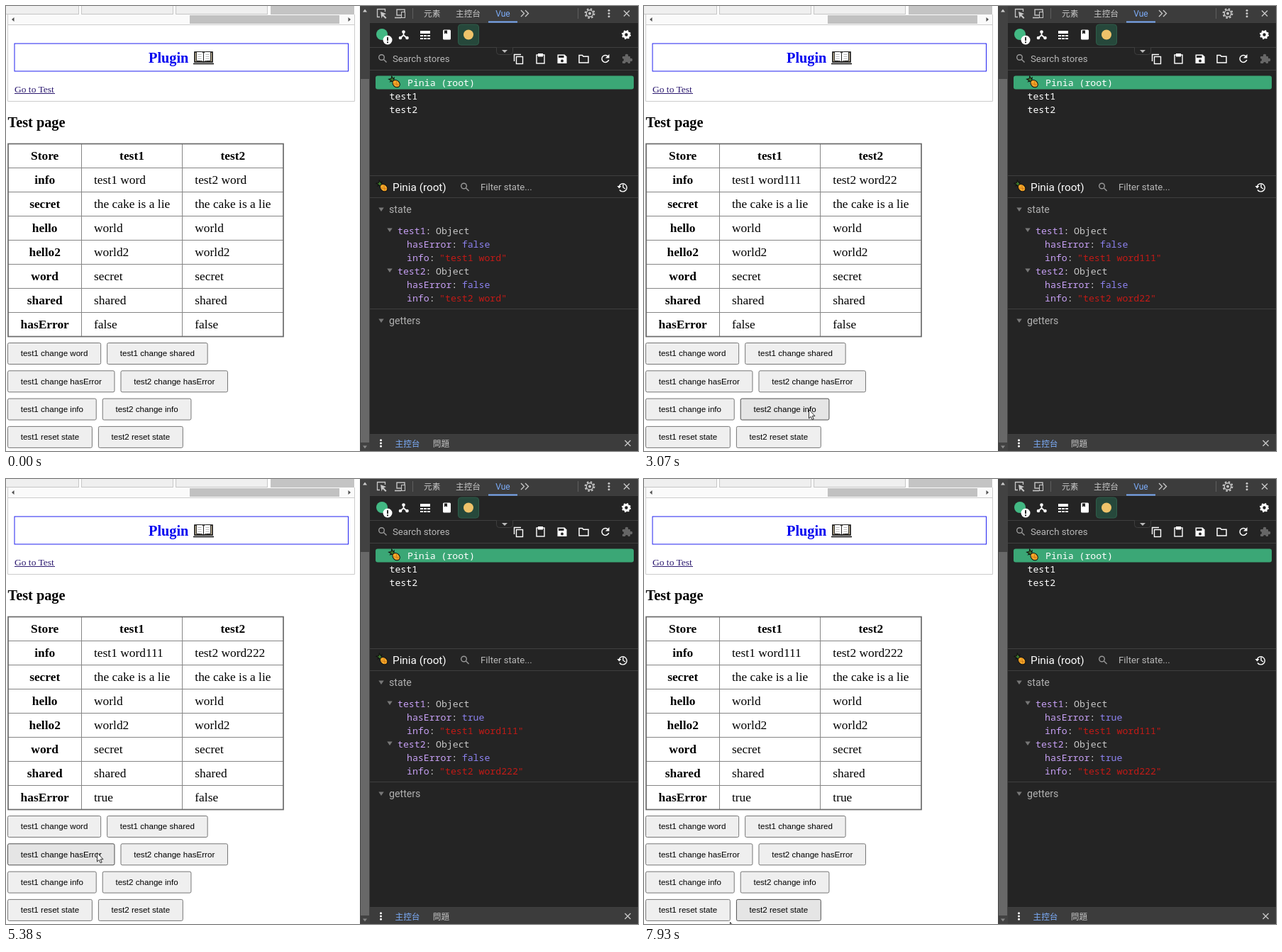
Write an HTML page that moves like this. It is 891 px wide and 628 px high and loops after 8 s.

```html
<!DOCTYPE html>
<html lang="zh-Hant">
<head>
<meta charset="utf-8">
<title>Store plugin test</title>
<style>
html, body { margin: 0; width: 100%; height: 100%; overflow: hidden; background: #fff; }
svg { display: block; width: 891px; height: 628px; }
text { white-space: pre; }
.serif { font-family: "Liberation Serif", "Times New Roman", serif; font-size: 17.4px; }
.title { font-size: 20.3px; }
.link { font-size: 13.5px; }
.bold { font-weight: 700; }
.mid { text-anchor: middle; }
.arial { font-family: "Liberation Sans", Arial, sans-serif; font-size: 11.6px; }
.ui { font-family: Roboto, sans-serif; font-size: 13.2px; }
.tab { font-size: 12px; }
.section { font-size: 14.2px; }
.store { font-size: 15.3px; }
.cjk { font-family: "Noto Sans CJK TC", "Noto Sans CJK", sans-serif; font-size: 11.7px; }
.mono { font-family: "Roboto Mono", "Noto Sans Mono", monospace; font-size: 13.2px; }
</style>
</head>
<body>
<svg id="stage" viewBox="0 0 891 628" xmlns="http://www.w3.org/2000/svg"></svg>
<script>
const stage = document.getElementById('stage');

function el(tag, attrs, parent = stage) {
  const node = document.createElementNS('http://www.w3.org/2000/svg', tag);
  for (const key in attrs) node.setAttribute(key, attrs[key]);
  parent.appendChild(node);
  return node;
}
const group = (x, y) => el('g', { transform: `translate(${x} ${y})` });
const rect = (x, y, width, height, fill, more, parent) =>
  el('rect', { x, y, width, height, fill, ...more }, parent);
const frame = (x, y, w, h, stroke, width = 1) =>
  rect(x, y, w, h, 'none', { stroke, 'stroke-width': width });
const path = (d, fill, parent, more) => el('path', { d, fill, ...more }, parent);
const line = (d, stroke, width = 1, parent) => path(d, 'none', parent, { stroke, 'stroke-width': width });
const dot = (cx, cy, r, fill, parent) => el('circle', { cx, cy, r, fill }, parent);
const ring = (cx, cy, r, stroke, width, more) =>
  el('circle', { cx, cy, r, fill: 'none', stroke, 'stroke-width': width, ...more });
function label(x, y, words, cls, fill) {
  const node = el('text', { x, y, class: cls, fill });
  node.textContent = words;
  return node;
}

// ---- Page ----
rect(0, 0, 499, 628, '#fff');
for (let i = 0; i < 3; i++) rect(133 * i - 26.5, -20, 129, 31.5, '#efefef', { stroke: '#c6c6c6' });
rect(373, 0, 118, 12, '#c4c4c4');
rect(2, 12, 490, 14, '#fafafa');
rect(259, 13, 211, 12, '#c1c1c1');
path('M11.5 16v6l-3.5-3z', '#505050');
path('M482.5 16v6l3.5-3z', '#505050');
line('M2.5 12V134.5H491.5V12M2 26.5H492', '#ccc');

frame(12, 53, 470.5, 39, '#2020f0');
label(201, 80, 'Plugin', 'serif title bold', '#0000f0');
line('M264 81.5H293', '#111', 1.6);
rect(266, 65, 25, 14, '#d8c9a8', { stroke: '#111', 'stroke-width': 1.6 });
for (const side of [-1, 1]) {
  const page = el('g', { transform: `translate(278.5 64.5) scale(${side} 1)` });
  path('M0 3q0-3 3-3h7v13h-6q-3 0-4 2z', '#fff', page, { stroke: '#222' });
  line('M3 4h5m-5 3h5m-5 3h5', '#aaa', .8, page);
}

label(12, 122, 'Go to Test', 'serif link', '#2c1a70');
line('M12 123.5H69', '#2c1a70');
label(2.5, 171, 'Test page', 'serif title bold', '#000');

for (let i = 1; i < 8; i++) line(`M3 ${194.5 + 34 * i}H391`, '#858585');
line('M106.5 194V466M248.5 194V466', '#858585');
frame(3, 194.5, 388, 272, '#6a6a6a', 1.7);

const rows = [
  ['Store', 'test1', 'test2'], ['info', ''],
  ['secret', 'the cake is a lie'], ['hello', 'world'], ['hello2', 'world2'],
  ['word', 'secret'], ['shared', 'shared'], ['hasError', '']
];
const cells = rows.map(([name, a, b = a], i) => {
  const y = 217 + 34 * i;
  label(54.7, y, name, 'serif bold mid', '#000');
  return [a, b].map((words, j) => i
    ? label(124 + 142.3 * j, y, words, 'serif', '#000')
    : label(177.5 + 142.3 * j, y, words, 'serif bold mid', '#000'));
});

const buttons = [
  ['test1 change word', 'test1 change shared'],
  ['test1 change hasError', 'test2 change hasError'],
  ['test1 change info', 'test2 change info'],
  ['test1 reset state', 'test2 reset state']
].flatMap((pair, i) => {
  let x = 2.5;
  const y = 475.5 + 39.3 * i;
  return pair.map(words => {
    const box = rect(x, y, 0, 30, '#efefef', { rx: 2 });
    const text = label(x + 18.2, y + 18.8, words, 'arial', '#000');
    const w = text.getComputedTextLength() + 36.4;
    box.setAttribute('width', w);
    const button = { x, y, w, h: 30, box };
    x += w + 9;
    return button;
  });
});

rect(499, 0, 14, 628, '#424242');
const thumb = rect(500, 103, 12, 513, '#686868');
path('M503 8.5h6l-3-4z', '#ccc');
path('M503 620.5h6l-3 4z', '#888');

// ---- Dev panel ----
const soft = '#c7c7c7', blue = '#7cacf8', white = '#fff', dark = '#242424', edge = '#3f3f3f';
rect(513, 0, 378, 628, dark);
for (const y of [0, 604]) rect(513, y, 378, 24, '#3c3c3c');
for (const y of [23, 58, 90, 239, 270, 427, 604]) rect(513, y, 378, 1, edge);

function kebab(x, y, fill, parent) {
  for (const d of [-4.3, 0, 4.3]) dot(x, y + d, 1.5, fill, parent);
}
function cross(x, y) { line(`M${x - 4} ${y - 4}l8 8m0-8l-8 8`, soft, 1.4); }
function lens(x, y) {
  ring(x - 1, y - 1.5, 3.8, '#999', 1.4);
  line(`M${x + 2} ${y + 1.5}l4 4`, '#999', 1.5);
}
function gear(x, y, color, r, width) {
  ring(x, y, r, color, width);
  ring(x, y, r + 1.7, color, 2, { 'stroke-dasharray': (r + 1.7) * Math.PI / 8 });
}

// Tab bar
line('M534.5 8V4.5H523.5V15.5H527', soft, 1.3);
path('M528 8l8 3-3.5 1.5 4 4-1.5 1.5-4-4-1.5 3.5z', soft);
frame(551, 5, 11, 8, soft, 1.4);
line('M548 16.5H557', soft, 1.6);
rect(557.5, 8.5, 5, 8, '#3c3c3c', { stroke: soft });
line('M573.5 3V18M806.5 3V18', '#5e5e5e');
label(600.7, 14.5, '元素', 'cjk mid', soft);
label(651.5, 14.5, '主控台', 'cjk mid', soft);
label(700.5, 14.5, 'Vue', 'ui tab mid', blue);
rect(680, 21.5, 41, 2, blue);
for (const x of [726, 732]) line(`M${x} 6l4.5 4.5-4.5 4.5`, soft, 1.4);
gear(823, 10.5, soft, 4.7, 1.4);
dot(823, 10.5, 2, soft);
kebab(850, 10.5, soft);
cross(875, 10.5);

// Tool bar
dot(530, 40, 8, '#42b883');
dot(538, 48, 6.5, white);
line('M538 44v5m0 1.3v2', dark, 1.9);
line('M560.5 37V41L556 45M560.5 41L565 45', white, 1.7);
dot(560.5, 36.5, 2.3, white);
for (const x of [556, 565.5]) dot(x, 45, 2.3, white);
rect(584, 35, 14, 4, white);
for (const y of [42, 46]) el('line', { x1: 584, x2: 598, y1: y, y2: y, stroke: white, 'stroke-width': 2, 'stroke-dasharray': '4 1' });
rect(616, 33.5, 11, 14, white, { rx: 1.5 });
path('M618 34.5h4v5l-2-1.3-2 1.3z', dark);
rect(637.5, 26, 29, 29, '#26483b', { rx: 4, stroke: '#2f5d4a' });
dot(652, 40.5, 7, '#efc36a');
gear(874.5, 40.5, white, 3.8, 3.2);

// Search bar
lens(530.5, 74);
label(545, 79, 'Search stores', 'ui', '#b8b8b8');
path('M691.5 58.5v6q0 4 4 4h15q4 0 4-4v-6', dark, stage, { stroke: edge });
path('M699 62h8l-4 4z', '#bbb');
line('M716.5 78V68.5H726', white, 1.4);
frame(719.5, 71.5, 9, 10, white, 1.4);
frame(748, 69, 11, 12, white, 1.4);
rect(750, 67, 7, 4.5, white);
path('M777.5 68.5h10l3 3v9.5h-13z', white);
rect(779, 70, 7.5, 3, dark);
dot(784, 77.5, 2, dark);
line('M808 69.5h4.5l1.5 1.7h7v8.8h-13z', white, 1.5);
line('M848.7 71A5 5 0 1 0 849.8 76', white, 1.5);
path('M850.5 68v5.5h-5.5z', white);
rect(869, 71, 11, 10, '#666', { rx: 1 });
dot(875, 70, 2.3, '#666');
dot(881, 76, 2.3, '#666');
dot(869, 76, 2, dark);
dot(875, 81, 2, dark);

// Small tilted pineapple used as an emoji
function fruit(x, y) {
  const g = el('g', { transform: `translate(${x} ${y}) rotate(-45)` });
  path('M0-2l-4-3 2 0-1-4 3 2 3-2-1 4 2 0z', '#3d7a2c', g, { stroke: '#111' });
  el('ellipse', { cy: 3, rx: 4.5, ry: 5.8, fill: '#f7a928', stroke: '#111' }, g);
  line('M-3 0l5 7M3 0l-5 7', '#c9741a', .8, g);
}

// Store tree
rect(521, 98.5, 364, 19, '#3ba776', { rx: 3 });
fruit(548, 107.5);
label(566, 113, 'Pinia (root)', 'mono', white);
label(540.5, 132, 'test1', 'mono', white);
label(540.5, 151, 'test2', 'mono', white);

// State inspector
fruit(530.5, 254.5);
label(545, 261, 'Pinia (root)', 'ui store', white);
lens(646.5, 255.5);
label(669, 260, 'Filter state...', 'ui', '#b8b8b8');
line('M865 259.5A5.6 5.6 0 1 0 864.5 254M870 252V256l3 2', white, 1.4);
path('M861.5 254h6l-3 3.5z', white);

function caret(x, y) { path(`M${x - 3.7} ${y - 2.5}h7.4l-3.7 5.5z`, '#777'); }
caret(529, 287);
caret(529, 444);
caret(541, 316);
caret(541, 373);
label(540, 292, 'state', 'ui section', '#b0b0b0');
label(540, 448.5, 'getters', 'ui section', '#b0b0b0');

const CHAR = 7.92;
const ROW = 19.1;
function prop(i, x, key, value, color) {
  const y = 321.7 + ROW * i;
  const end = x + key.length * CHAR;
  label(x, y, key, 'mono', '#c7a0f5');
  label(end, y, ':', 'mono', '#ddd');
  const start = end + CHAR + 6.5;
  return { start, node: label(start, y, value, 'mono', color) };
}
const props = [0, 1].flatMap(j => [
  prop(3 * j, 552, 'test' + (j + 1), 'Object', '#c8c8c8'),
  prop(3 * j + 1, 565, 'hasError', '', '#8c82f0'),
  prop(3 * j + 2, 565, 'info', '', '#c41a16')
]);

// Row tools: pencil, bin, menu
const tools = group(0, 0);
path('M-5 5.5v-2.8l7-7 2.8 2.8-7 7zM3-5.3l1.5-1.5 2.8 2.8-1.5 1.5z', white, tools);
path('M30.5-3.5h8v9h-8zM30-6h9v1.5h-9z', white, tools);
kebab(59.5, 0, white, tools);

// Drawer
kebab(528.5, 617, white);
label(566, 621.5, '主控台', 'cjk mid', blue);
label(613.5, 621.5, '問題', 'cjk mid', soft);
cross(876.5, 617);

const cursor = group(0, 0);
path('M.5.5V13L3.3 10.4 5.2 14.8 7.2 14 5.3 9.7H9z', white, cursor, { stroke: '#2b2b2b' });

// ---- Motion ----
// A burst of pointer activity runs in even steps through [step, x, y] keys,
// starting from where the last burst ended unless it has a key at step 0.
const bursts = [];
function burst(start, end, count, ...keys) {
  const last = bursts[bursts.length - 1];
  if (!keys.length || keys[0][0] > 0) keys.unshift([0, ...last.keys[last.keys.length - 1].slice(1)]);
  bursts.push({ start, count, step: (end - start) / (count - 1), keys });
}
burst(390, 1150, 12, [0, 641, 613], [3, 330, 505], [7, 130, 555], [11, 120, 562]);
burst(1220, 1990, 11, [9, 120, 562], [10, 168, 568]);
burst(2060, 2340, 5, [4, 232, 569]);
burst(2800, 3540, 10, [7, 232, 569], [9, 505, 480]);
burst(3610, 4360, 10, [0, 580, 445], [3, 667, 425], [9, 128, 527]);
burst(5380, 5590, 4, [3, 225, 530]);
burst(5790, 6550, 12, [9, 225, 530], [11, 400, 536]);
burst(6620, 7390, 12, [0, 725, 459], [5, 690, 282], [11, 641, 439]);
burst(7450, 7930, 7, [0, 560, 470], [2, 330, 540], [5, 165, 604], [6, 121, 625]);

function along(keys, k) {
  const n = keys.findIndex(key => key[0] >= k);
  if (n < 0) return keys[keys.length - 1].slice(1);
  if (n === 0) return keys[0].slice(1);
  const [a, b] = [keys[n - 1], keys[n]];
  const f = (k - a[0]) / (b[0] - a[0]);
  return [1, 2].map(i => a[i] + (b[i] - a[i]) * f);
}

function pointer(t) {
  const now = bursts.filter(b => b.start <= t).pop();
  if (!now) return null;
  const k = Math.min(now.count - 1, Math.floor((t - now.start) / now.step + 0.01));
  const at = along(now.keys, k);
  // Leaving the page keeps the last hover state.
  return { at, hover: at[1] > 620 ? along(now.keys, k - 1) : at };
}

const suffix = (digit, t, first, gap) =>
  digit.repeat(Math.max(0, Math.min(3, Math.floor((t - first) / gap) + 1)));

function draw(t) {
  const info = [
    'test1 word' + suffix('1', t, 1370, 230),
    'test2 word' + suffix('2', t, 2880, 165)
  ];
  const errors = [t >= 4820, t >= 6060];
  for (const j of [0, 1]) {
    cells[1][j].textContent = info[j];
    cells[7][j].textContent = errors[j];
    props[3 * j + 1].node.textContent = errors[j];
    props[3 * j + 2].node.textContent = `"${info[j]}"`;
  }

  const p = pointer(t);
  const [hx, hy] = p ? p.hover : [-99, -99];
  cursor.setAttribute('visibility', p ? 'visible' : 'hidden');
  if (p) cursor.setAttribute('transform', `translate(${p.at.join(' ')})`);

  for (const { x, y, w, h, box } of buttons) {
    const over = hx >= x && hx <= x + w && hy >= y && hy <= y + h;
    box.setAttribute('fill', over ? '#e5e5e5' : '#efefef');
    box.setAttribute('stroke', over ? '#4f4f4f' : '#767676');
  }
  thumb.setAttribute('fill', hx >= 500 && hx < 512 && hy > 103 ? '#7b7b7b' : '#686868');

  const row = Math.floor((hy - 308) / 19.8);
  const target = hx > 525 && props[row];
  tools.setAttribute('visibility', target ? 'visible' : 'hidden');
  if (target) {
    const right = target.start + target.node.textContent.length * CHAR;
    tools.setAttribute('transform', `translate(${right + 15.5} ${316.5 + ROW * row})`);
  }
}

const began = performance.now();
function tick() {
  draw((performance.now() - began) % 8000);
  requestAnimationFrame(tick);
}
tick();
</script>
</body>
</html>
```
